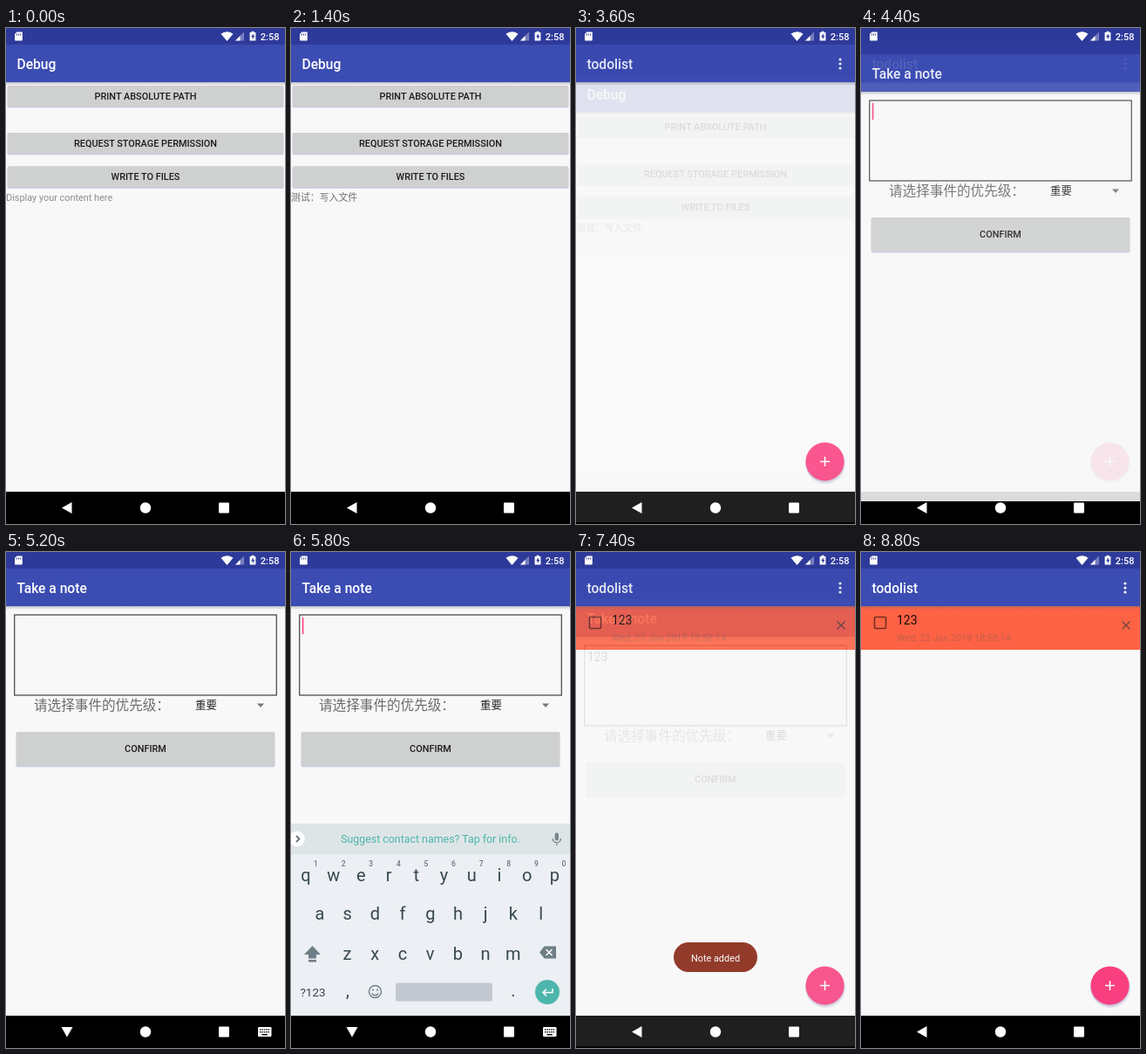
These frames come from a looping animation (320 px wide and 568 px high, 9.8 s). An HTML page:

```html
<!DOCTYPE html>
<html lang="en">
<head>
<meta charset="utf-8">
<title>Note app walkthrough</title>
<style>
html, body { margin: 0; width: 100%; height: 100%; overflow: hidden; background: #000; }
svg { display: block; width: 320px; height: 568px; }
text { font-family: Roboto, "Noto Sans CJK SC", "Noto Sans CJK", sans-serif; white-space: pre; }
</style>
</head>
<body>
<svg id="stage" viewBox="0 0 320 568">
  <defs>
    <linearGradient id="drop" x1="0" y1="0" x2="0" y2="1">
      <stop offset="0" stop-color="#667" stop-opacity=".4"/>
      <stop offset="1" stop-color="#667" stop-opacity="0"/>
    </linearGradient>
    <clipPath id="aboveNav"><rect width="320" height="531"/></clipPath>
  </defs>
  <g id="todo"></g>
  <g id="debug"></g>
  <g id="note"></g>
  <g clip-path="url(#aboveNav)"><g id="keys"></g></g>
  <g id="toast"></g>
  <g id="status" fill="#fff"></g>
  <g id="nav" fill="#fff"></g>
</svg>
<script>
const LOOP = 9800, TICK = 200;
const $ = id => document.getElementById(id);

const rect = (x, y, w, h, fill, more = '') =>
  `<rect x="${x}" y="${y}" width="${w}" height="${h}" fill="${fill}" ${more}/>`;
const circle = (x, y, r, fill, more = '') =>
  `<circle cx="${x}" cy="${y}" r="${r}" fill="${fill}" ${more}/>`;
const path = (d, more = '') => `<path d="${d}" ${more}/>`;
const line = (d, color, w) => path(d, `fill="none" stroke="${color}" stroke-width="${w}"`);
const text = (str, x, y, size, fill, more = '') =>
  `<text x="${x}" y="${y}" font-size="${size}" fill="${fill}" ${more}>${str}</text>`;
const MID = 'text-anchor="middle"', MEDIUM = 'font-weight="500"';

// A whole app window: status colour, app bar, body and navigation background
const page = (title, body) =>
  rect(0, 0, 320, 531, '#f8f8f8') + body +
  rect(0, 62, 320, 4, 'url(#drop)') +
  rect(0, 19, 320, 43, '#3b4cb2') + rect(0, -40, 320, 59, '#2e3a9a') +
  text(title, 12.5, 46.5, 15.6, '#fff', MEDIUM) +
  rect(0, 531, 320, 80, '#000');

const button = (label, x, y, w, h, id) =>
  rect(x - .5, y, w + 1, h + 1.2, '#c3c8dc', 'rx="2"') +
  rect(x, y, w, h, '#cfd0d0', 'rx="2"') +
  rect(x, y, w, h, '#000', `rx="2" opacity="0" id="${id}"`) +
  text(label, 160, y + h / 2 + 3.9, 10.9, '#1c1c1c', MID + ' ' + MEDIUM);

$('debug').innerHTML = page('Debug',
  button('PRINT ABSOLUTE PATH', 2, 66, 316, 24, 'pathHit') +
  button('REQUEST STORAGE PERMISSION', 2, 120, 316, 24, 'askHit') +
  button('WRITE TO FILES', 2, 158.5, 316, 24, 'writeHit') +
  text('', 0, 197.5, 10.9, '#8c8c8c', 'id="content"'));

$('note').innerHTML = page('Take a note',
  rect(9.75, 72, 300.5, 92, 'none', 'stroke="#303030" stroke-width="1.1"') +
  text('', 13, 90, 14, '#222', 'id="typed"') +
  rect(0, 75, 1.6, 19, '#ff4081', 'id="caret"') +
  text('请选择事件的优先级：', 32, 181, 15.6, '#6c6c6c', MEDIUM) +
  text('重要', 217, 180, 12.4, '#222') +
  path('M288 173.5h8l-4 4.5z', 'fill="#757575"') +
  button('CONFIRM', 12, 206, 296, 39, 'okHit'));

$('todo').innerHTML = page('todolist',
  `<g id="row">${
    rect(0, 62, 320, 50, '#fd6244') +
    rect(15.5, 74.5, 13, 13, 'none', 'stroke="#74301f" stroke-width="1.6" rx="1"') +
    text('123', 41, 83, 14, '#1a0c08') +
    text('Wed, 23 Jan 2019 18:58:14', 41, 102, 10.9, '#c4604c') +
    line('M299.5 79.5l9 9m0-9l-9 9', '#70483f', 1.4)
  }</g>` +
  circle(286, 499, 23, '#5a4690', 'opacity=".14"') +
  circle(285.5, 497.5, 22.4, '#5a4690', 'opacity=".2"') +
  circle(285.5, 496.5, 22, '#f93f7f') +
  circle(285.5, 496.5, 22, '#fff', 'opacity="0" id="fabHit"') +
  line('M280 496.5h11m-5.5-5.5v11', '#fff', 1.5)) +
  [36, 41, 46].map(y => circle(303, y, 1.6, '#fff')).join('');

const INK = '#37474f', TEAL = '#4db6a8';
const keyRow = (chars, x0, y) => [...chars].map((c, i) =>
  text(c, x0 + i * 31.7, y, 20, INK, MID)).join('');

$('keys').innerHTML =
  rect(0, 311, 320, 220, '#eceff3') + rect(0, 311, 320, 35, '#dee5e7') +
  circle(7, 328.5, 9, '#fff') + line('M6 325l3.5 3.5-3.5 3.5', '#455a64', 1.5) +
  text('Suggest contact names? Tap for info.', 160, 333, 12.4, TEAL, MID) +
  rect(302.6, 321.5, 4.4, 9, '#78868d', 'rx="2.2"') +
  line('M300 328a4.8 4.8 0 0 0 9.6 0M304.8 333v3', '#78868d', 1.3) +
  keyRow('qwertyuiop', 17, 377) + keyRow('asdfghjkl', 33, 421) + keyRow('zxcvbnm', 64.5, 467) +
  [...'1234567890'].map((c, i) => text(c, 28.5 + i * 31.6, 360, 8.5, '#66757d', MID + ' ' + MEDIUM)).join('') +
  path('M24.5 451l9.5 10h-5v4.5h-9V461h-5zM20 467h9v2.6h-9z', 'fill="#6f7e86"') +
  path('M285 458.5l5.5-7H304v14h-13.5z', 'fill="#6f7e86"') +
  line('M292.5 455l7 7m0-7l-7 7', '#fff', 1.5) +
  text('?123', 25, 508.5, 13.5, INK, MID) + text(',', 65, 509, 20, INK, MID) +
  circle(96.5, 503.5, 7, 'none', 'stroke="#6f7e86" stroke-width="1.4"') +
  circle(94, 501.5, 1.1, '#6f7e86') + circle(99, 501.5, 1.1, '#6f7e86') +
  line('M92.8 505.2a4 4 0 0 0 7.4 0', '#6f7e86', 1.3) +
  rect(120, 493.5, 111, 21, '#c2c9d1', 'rx="2"') +
  text('.', 255, 509, 20, INK, MID) +
  circle(294, 504, 14, '#4db6ac') +
  line('M300 500v4.5h-11m4-4l-4 4 4 4', '#fff', 1.6);

$('toast').innerHTML = rect(112, 447, 96, 34, '#933b2b', 'rx="17"') +
  text('Note added', 160, 468.5, 10.9, '#fff', MID);

$('status').innerHTML =
  path('M12.5 4.5H18a.8.8 0 0 1 .8.8v8.4a.8.8 0 0 1-.8.8h-7.2a.8.8 0 0 1-.8-.8V7z') +
  path('M12.5 6.5v2m2-2v2m2-2v2', 'stroke="#2e3a9a" stroke-width=".9"') +
  path('M246.5 6.8a11 11 0 0 1 14 0l-7 8.2z') +
  path('M273 4.5v10h-10z', 'opacity=".35"') + path('M268.5 9v5.5H263z') +
  path('M281.6 3.8h2.8v1.2h2v9.5h-6.8V5h2z') +
  path('M283.8 6.2l-2.8 4h1.7v3l2.6-4.2h-1.5z', 'fill="#2e3a9a"') +
  text('2:58', 313.5, 13.5, 11, '#fff', 'text-anchor="end" ' + MEDIUM);

const keyDots = [546.2, 549].map(y => [0, 1, 2, 3, 4].map(i =>
  rect(291 + i * 2.4, y, 1.4, 1.4, '#000')).join('')).join('');
$('nav').innerHTML =
  rect(28, 531, 84, 37, '#212121', 'rx="18.5" id="backHit"') +
  path('M64 549.5L75.5 543v13z', 'id="back"') +
  path('M63.5 544h13L70 555.5z', 'id="hide"') +
  circle(160, 549.5, 6.2, '#fff') + rect(244, 543.5, 12, 12, '#fff', 'rx="1"') +
  `<g id="ime">${rect(289, 544, 15.5, 11, '#fff', 'rx="1.3"') + keyDots +
    rect(293.4, 552, 6.4, 1.4, '#000')}</g>`;

// Value of the last [time, value] entry that has been reached
const at = (t, steps) => steps.reduce((v, [from, next]) => t >= from ? next : v, steps[0][1]);
const alpha = (id, v) => $(id).setAttribute('opacity', v);
const shift = (id, x, y) => $(id).setAttribute('transform', `translate(${x} ${y})`);
const span = (t, a, b) => t >= a && t < b ? 1 : 0;

const track = {
  debugAlpha: [[0, 1], [3400, .75], [3600, .12], [3800, 0]],
  debugY: [[0, 0], [3400, 8], [3600, 35]],
  noteAlpha: [[0, 0], [4400, .89], [4600, 1], [7200, .75], [7400, .12], [7600, 0]],
  noteY: [[0, 0], [4400, 11], [4600, 1], [4800, 0], [7200, 8], [7400, 35]],
  keysY: [[0, 220], [5400, 150], [5600, 35], [5800, 0], [7200, 120], [7400, 220]],
  toast: [[0, 0], [7200, .5], [7400, 1], [8400, .66], [8600, .33], [8800, 0]],
  ask: [[0, 0], [200, .06], [400, .12], [600, .06], [800, 0]],
  write: [[0, 0], [1000, .06], [1200, .12], [1400, 0]],
  ok: [[0, 0], [7000, .12], [7400, 0]],
  fab: [[0, 0], [4200, .25], [4400, .1], [4600, 0]],
  back: [[0, 0], [3000, .6], [3200, 1], [3400, .5], [3600, 0]],
  typed: [[0, ''], [6200, '1'], [6400, '12'], [6600, '123']],
  content: [[0, 'Display your content here'], [1200, '测试：写入文件']]
};

function draw(t) {
  const v = name => at(t, track[name]);
  alpha('debug', v('debugAlpha')); shift('debug', 0, v('debugY'));
  alpha('note', v('noteAlpha')); shift('note', 0, v('noteY'));
  shift('keys', 0, v('keysY'));
  alpha('toast', v('toast'));
  alpha('askHit', v('ask')); alpha('writeHit', v('write'));
  alpha('okHit', v('ok')); alpha('fabHit', v('fab')); alpha('backHit', v('back'));
  alpha('row', span(t, 7200, LOOP));

  $('content').textContent = v('content');
  $('content').setAttribute('fill', t < 1200 ? '#8c8c8c' : '#707070');
  const typed = v('typed');
  $('typed').textContent = typed;
  $('caret').setAttribute('x', 12.8 + typed.length * 7.8);
  alpha('caret', span(t, 4400, 5000) || span(t, 5400, 7200));

  const ime = span(t, 5000, 7200);
  alpha('ime', ime); alpha('hide', ime); alpha('back', 1 - ime);
}

const start = performance.now();
let last = -1;
function frame() {
  const t = Math.floor((performance.now() - start) % LOOP / TICK) * TICK;
  if (t !== last) draw(last = t);
  requestAnimationFrame(frame);
}
draw(0);
frame();
</script>
</body>
</html>
```
